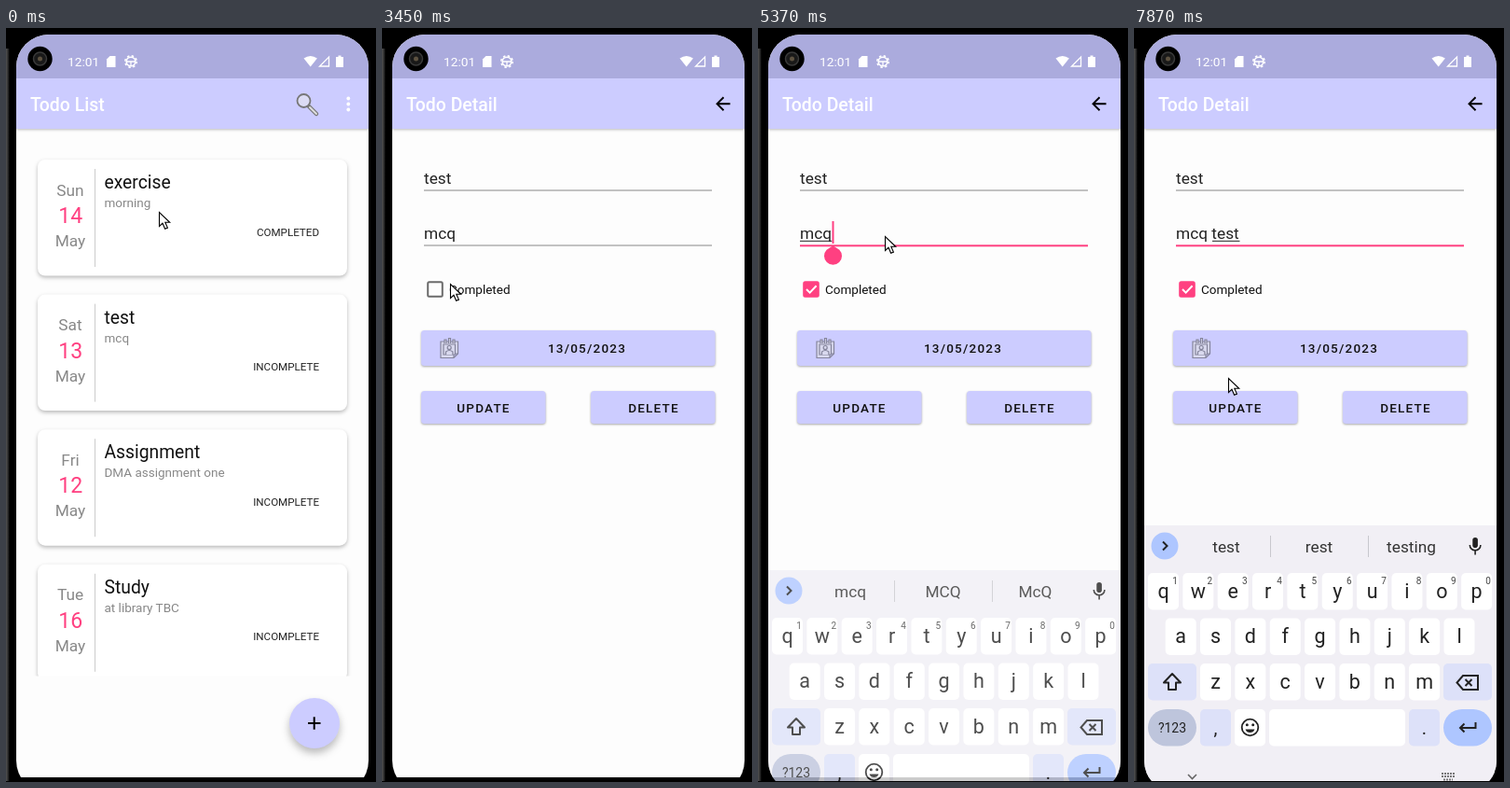
These frames come from a looping animation (397 by 808 pixels, 7990 ms). An HTML page:

```html
<!DOCTYPE html>
<html lang="en">
<head>
<meta charset="utf-8">
<title>Todo app</title>
<style>
html, body { margin: 0; width: 100%; height: 100%; overflow: hidden; background: #000; }
svg { display: block; font-family: Roboto, sans-serif; }
.card { filter: drop-shadow(0 2px 2px #0004); }
.raised { filter: drop-shadow(0 1.5px 1.2px #0005); }
.fab { filter: drop-shadow(0 5px 4px #0004); }
.bar { filter: drop-shadow(0 1px 1.5px #0004); }
.line { fill: none; stroke: #222; stroke-width: 2; }
</style>
</head>
<body>
<svg id="stage" width="397" height="808" viewBox="0 0 397 808"></svg>
<script>
const PINK = '#ff4081', LILAC = '#ccccff', LOOP = 7990;

const text = (x, y, size, fill, str, extra = '') =>
  `<text x="${x}" y="${y}" font-size="${size}" fill="${fill}" ${extra}>${str}</text>`;
const rect = (x, y, w, h, fill, r = 0, extra = '') =>
  `<rect x="${x}" y="${y}" width="${w}" height="${h}" rx="${r}" fill="${fill}" ${extra}/>`;
const circle = (x, y, r, fill, extra = '') =>
  `<circle cx="${x}" cy="${y}" r="${r}" fill="${fill}" ${extra}/>`;
const path = (d, extra = 'class="line"') => `<path d="${d}" ${extra}/>`;
const MID = 'text-anchor="middle"', BOLD = 'font-weight="500"';

// Todo list screen
function card([day, date, title, note, status], i) {
  const y = 141 + i * 144.6;
  return rect(34, y, 332, 124.5, '#fff', 8, 'class="card"') +
    text(69, y + 38.5, 17.3, '#888', day, MID) +
    text(69.3, y + 68, 23.1, PINK, date, MID) +
    text(69, y + 93, 17.3, '#888', 'May', MID) +
    rect(95, y + 10, 1, 105, '#ccc') +
    text(105.5, y + 31, 19.3, '#111', title) +
    text(105.5, y + 51, 13.5, '#888', note) +
    text(336, y + 81.5, 11.6, '#222', status, 'text-anchor="end"');
}

const listScreen = () =>
  text(26, 89, 19.4, '#fff', 'Todo List', BOLD) +
  path('M325 84l8 8', 'stroke="#777" stroke-width="4.5" stroke-linecap="round"') +
  path('M326 85l7 7', 'stroke="#ddd" stroke-width="2" stroke-linecap="round"') +
  circle(319.5, 78, 7, '#dcdcf4', 'stroke="#777" stroke-width="1.8"') +
  [75.5, 81.5, 87.5].map(y => circle(367.3, y, 1.9, '#fff')).join('') +
  '<g clip-path="url(#listArea)">' + [
    ['Sun', 14, 'exercise', 'morning', 'COMPLETED'],
    ['Sat', 13, 'test', 'mcq', 'INCOMPLETE'],
    ['Fri', 12, 'Assignment', 'DMA assignment one', 'INCOMPLETE'],
    ['Tue', 16, 'Study', 'at library TBC', 'INCOMPLETE'],
  ].map(card).join('') + '</g>' +
  circle(331, 745, 27, LILAC, 'class="fab"') +
  path('M324 745h13.5M330.7 738.2v13.5', 'stroke="#000" stroke-width="2"');

// Todo detail screen
const button = (x, y, w, h, label, mid) =>
  rect(x, y, w, h, LILAC, 3.5, 'class="raised"') +
  text(mid, y + h / 2 + 5, 13.5, '#111', label, `${MID} ${BOLD} letter-spacing="1.2"`);

const detailScreen = () =>
  text(26, 89, 19.4, '#fff', 'Todo Detail', BOLD) +
  path('M20 11H7.83l5.59-5.59L12 4l-8 8 8 8 1.41-1.41L7.83 13H20z',
    'transform="translate(354.3 69.7) scale(.963)"') +
  text(45, 167, 17.3, '#222', 'test') + rect(45, 173.5, 309, 1, '#888') +
  text(45, 225.7, 17.3, '#222', '', 'id="note" xml:space="preserve"') +
  rect(45, 232.5, 309, 1, '#888', 0, 'id="idleLine"') +
  rect(45, 232.3, 309, 2, PINK, 0, 'id="focusLine"') +
  rect(45, 227.8, 0, 1, '#222', 0, 'id="compose"') +
  rect(79.5, 207, 2, 24, PINK, 0, 'id="caret"') +
  path('M80.5 233.3L87.4 237.7A9.5 9.5 0 1 1 73.6 237.7Z', `id="handle" fill="${PINK}"`) +
  circle(57, 280, 19, '#dcdcdc', 'id="ripple"') +
  rect(49.2, 272.2, 15.6, 15.6, 'none', 1.5, 'id="box" stroke-width="2"') +
  path('M52 280l3.6 3.6 7-7.4', 'id="tick" fill="none" stroke="#fff" stroke-width="2"') +
  text(72, 285, 13.5, '#111', 'Completed') +
  button(42, 324, 315.5, 38, '13/05/2023', 220) +
  `<g fill="#d9d9ee" stroke="#85859c" stroke-width="1.2">
    <path d="M63 336h18.5v13l-4.5 4.5h-14zM81.5 349h-4.5v4.5"/>
    <path d="M66 339h12.5v11H66z"/><circle cx="72.2" cy="342.5" r="2"/>
    <path d="M68.5 350v-3q3.7-3 7.4 0v3M67 338v-4h2v4M71.5 338v-5.500h2v5.500M76 338v-4h2v4"/></g>` +
  button(42, 389, 133.5, 35, 'UPDATE', 109) +
  button(224, 389, 133.5, 35, 'DELETE', 291.5);

// On-screen keyboard
const PITCH = 37.35, KEY = '#dde1f9', BLUE = '#aec6ff';

const keyRow = (letters, x0, y, digits = '') => [...letters].map((c, i) => {
  const x = x0 + i * PITCH;
  return rect(x, y, 33, 39.5, '#fff', 5) + text(x + 16.5, y + 26.5, 21.5, '#222', c, MID) +
    (digits && text(x + 29, y + 11.5, 10, '#444', digits[i], MID));
}).join('');

const keyboard = () =>
  rect(11, 533, 378, 290, '#f1eff5') +
  circle(33, 555, 14.5, BLUE) + path('M31 550.5l4.500 4.500-4.500 4.500') +
  [99, 198.5, 297.5].map(x => text(x, 562, 17.3, '#333', '', `${MID} class="hint"`)).join('') +
  rect(146, 544, 1, 23, '#c8c8ce') + rect(251, 544, 1, 23, '#c8c8ce') +
  rect(363.3, 546, 5.6, 11, '#222', 2.8) + path('M360.300 554a5.800 5.800 0 0 0 11.600 0M366.100 560v4.500', 'class="line" style="stroke-width:1.6"') +
  keyRow('qwertyuiop', 15, 584, '1234567890') +
  keyRow('asdfghjkl', 33.7, 632.5) +
  keyRow('zxcvbnm', 71, 681) +
  rect(15, 681, 52, 39.5, KEY, 5) +
  path('M41 692l-9 9.500h5v7.500h8v-7.500h5z', 'class="line" stroke-linejoin="round"') +
  rect(332, 681, 52, 39.5, KEY, 5) +
  path('M353 694h16v15h-16l-6.500-7.500zM355.500 698l7 7m0-7l-7 7') +
  rect(15, 730, 52, 39.5, '#bec5dc', 20) + text(41, 755, 14, '#222', '?123', MID) +
  rect(71, 730, 33, 39.5, KEY, 5) + text(87.5, 757, 20, '#222', ',', MID) +
  rect(108, 730, 33, 39.5, '#fff', 5) +
  circle(124.5, 749.5, 8.8, 'none', 'stroke="#222" stroke-width="1.8"') +
  circle(121.300, 746.8, 1.5, '#222') + circle(127.7, 746.8, 1.5, '#222') +
  path('M119.500 751.500a5.300 5.300 0 0 0 10 0z', 'fill="#222"') +
  rect(145, 730, 146, 39.5, '#fff', 5) +
  rect(295, 730, 33, 39.5, KEY, 5) + text(311.5, 757, 20, '#222', '.', MID) +
  rect(332, 730, 52, 39.5, BLUE, 20) +
  path('M366.500 744v6h-16M354.500 745.500l-4.500 4.500 4.500 4.500') +
  path('M58 800l4.500 4.500 4.500-4.500', 'class="line" style="stroke:#666;stroke-width:1.6"') +
  path('M330 799h14M330 802h14M332 805.500h10', 'stroke="#777" stroke-width="2" stroke-dasharray="2 1"');

// Phone body and status bar
const status = () =>
  rect(11, 7, 378, 47, '#ababdd') +
  text(66, 41, 13.7, '#fff', '12:01') +
  path('M111.500 30H117.500V42H108V33.500z', 'fill="#fff"') +
  circle(134, 36, 4.8, 'none', 'stroke="#fff" stroke-width="1.6"') +
  circle(134, 36, 6.2, 'none', 'stroke="#fff" stroke-width="1.6" stroke-dasharray="2.4 2.47"') +
  path('M130 36h8M134 36v4.500', 'stroke="#fff" stroke-width="1.3"') +
  path('M319.500 32.500q7.200-5 14.400 0L326.700 41.500z', 'fill="#fff"') +
  path('M346.500 31v10h-10z', 'fill="none" stroke="#fff" stroke-width="1.3"') +
  path('M354 31h2.500v-1.500h3V31h2.500v11h-8z', 'fill="#fff"');

const stage = document.getElementById('stage');
stage.innerHTML = `<defs>
    <clipPath id="screen">${rect(11, 7, 378, 813, '#fff', 35)}</clipPath>
    <clipPath id="listArea">${rect(11, 110, 378, 584.5, '#fff')}</clipPath>
    <linearGradient id="edge"><stop stop-color="#555"/><stop offset="1" stop-color="#111"/></linearGradient>
  </defs>` +
  rect(0, 0, 397, 808, '#000') + rect(0, 22, 3.5, 786, 'url(#edge)') +
  '<g clip-path="url(#screen)">' +
  rect(11, 7, 378, 796, '#fdfdfd') +
  rect(11, 54, 378, 54, LILAC, 0, 'class="bar"') + status() +
  `<g id="list">${listScreen()}</g><g id="detail">${detailScreen()}</g>` +
  `<g id="keys">${keyboard()}</g></g>` +
  rect(0, 807, 397, 1, '#000') +
  circle(36.5, 33, 13.2, '#000') + circle(36.5, 33, 7, '#191919', 'stroke="#3a3a3a" stroke-width="1.5"') +
  circle(36.5, 33, 2.5, '#5c5140') +
  path('M.5 .5V15.500l3.500-3.200 2.600 6 2.800-1.200-2.600-5.800h4.900z',
    'id="pointer" fill="#fff" stroke="#000" stroke-width="1.1"');

// Held states: [start time, ...values]
const pointerKeys = [
  [0, 164, 197], [120, 150, 224], [240, 146, 260], [360, 177, 289], [510, 176, 329],
  [660, 161, 392], [810, 156, 434], [1090, 172, 404], [1210, 190, 366], [1330, 201, 343],
  [2930, 176, 296], [3050, 139, 240], [3180, 113, 261], [3330, 94, 268], [3450, 73, 274],
  [3600, 64, 275], [4280, 76, 262], [4400, 86, 252], [4550, 111, 238], [4670, 136, 223],
  [7600, 123, 264], [7750, 109, 335], [7870, 101, 375],
];
const noteKeys = [[0, 'mcq'], [6230, 'mcq '], [6350, 'mcq t'], [6500, 'mcq te'], [6900, 'mcq tes'], [7050, 'mcq test']];
const hintKeys = [
  [0, 'mcq', 'MCQ', 'McQ'], [6230, 'and', 'is', 'for'], [6350, 'the', 'to', 'test'],
  [6620, 'te', 'test', 'tell'], [7050, 'tes', 'test', 'yes'], [7200, 'test', 'rest', 'testing'],
];
const composeKeys = [[0, 45, 0], [4950, 45, 34.500], [6230, 45, 0], [7200, 84, 29.500]];
const caretKeys = [[0, 0], [4950, 1], [5800, 0], [6230, 1], [7750, 0]];
const caretX = { 'mcq': 79.5, 'mcq ': 83.5, 'mcq t': 88.5, 'mcq te': 98, 'mcq tes': 107, 'mcq test': 113 };
const handleKeys = [[0, 0], [5100, .3], [5220, .65], [5370, 1], [6230, 0]];
const rippleKeys = [[0, 0, 0], [4010, 12, .6], [4130, 19, 1], [4550, 19, .5], [4670, 0, 0]];
const keyboardKeys = [[0, 300, 0], [5100, 245, .05], [5220, 214, .17], [5370, 48, .8], [5490, 0, 1]];

const at = (keys, t) => keys.findLast(k => k[0] <= t).slice(1);
const hints = [...document.querySelectorAll('.hint')];
function set(id, attrs) {
  const el = document.getElementById(id);
  for (const k in attrs) el.setAttribute(k, attrs[k]);
}
const show = (id, on) => set(id, { visibility: on ? 'visible' : 'hidden' });

function draw(t) {
  const inDetail = t >= 2260, focused = t >= 4950, checked = t >= 4280;
  set('list', { display: inDetail ? 'none' : 'inline' });
  set('detail', { display: inDetail ? 'inline' : 'none' });
  set('pointer', { transform: `translate(${at(pointerKeys, t)})` });

  const [note] = at(noteKeys, t);
  document.getElementById('note').textContent = note;
  show('idleLine', !focused);
  show('focusLine', focused);
  const [x, width] = at(composeKeys, t);
  set('compose', { x, width });
  set('caret', { x: caretX[note], opacity: at(caretKeys, t)[0] });
  set('handle', { opacity: at(handleKeys, t)[0] });

  const [r, opacity] = at(rippleKeys, t);
  set('ripple', { r, opacity });
  set('box', { fill: checked ? PINK : 'none', stroke: checked ? PINK : '#6b6b6b' });
  show('tick', checked);

  const [dy, alpha] = at(keyboardKeys, t);
  set('keys', { transform: `translate(0 ${dy})`, opacity: alpha });
  at(hintKeys, t).forEach((word, i) => hints[i].textContent = word);
}

const start = performance.now();
function tick() {
  draw((performance.now() - start) % LOOP);
  requestAnimationFrame(tick);
}
tick();
</script>
</body>
</html>
```
